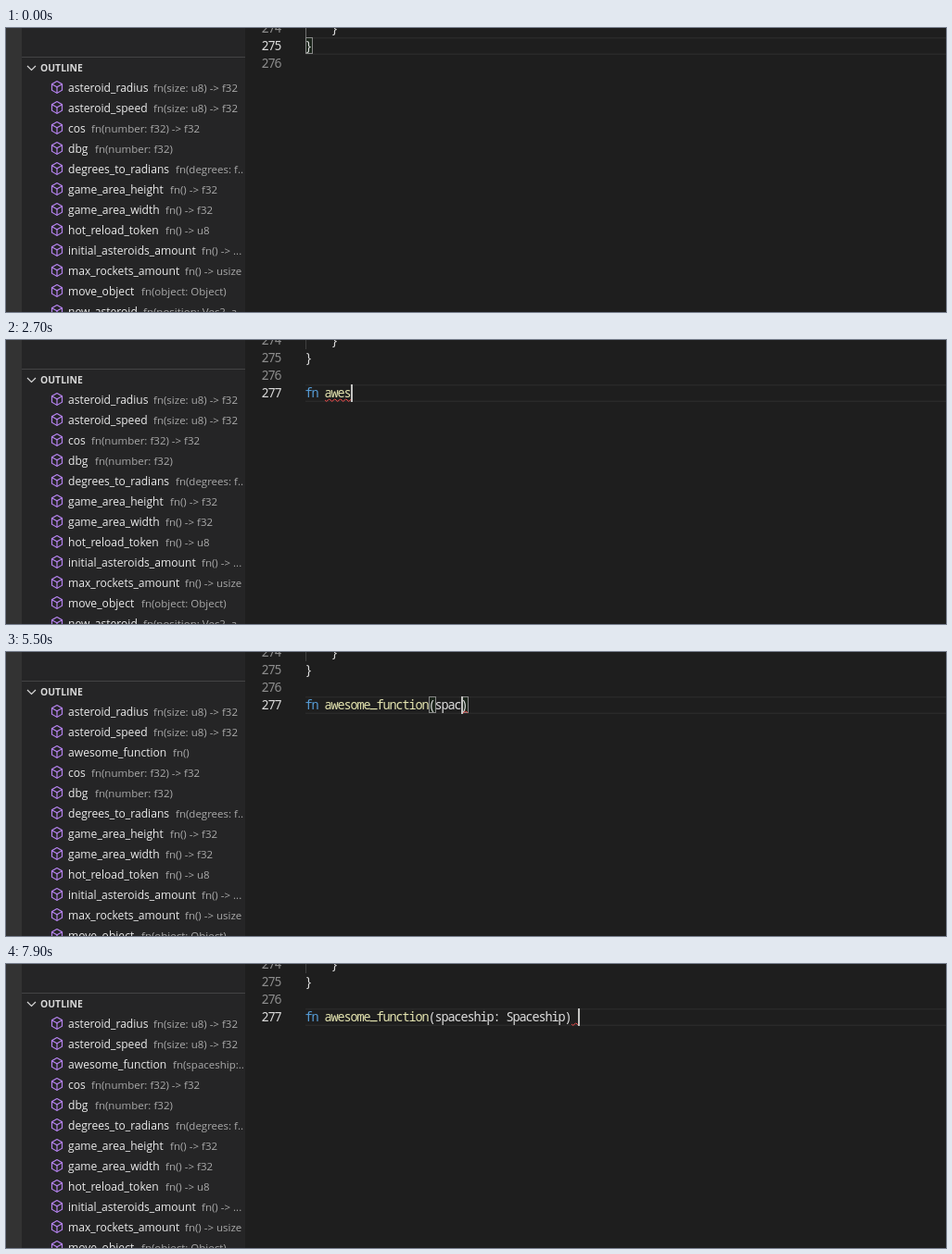
Animation, 1014 px wide and 307 px high, one loop 8 s. Source, as an HTML page with a canvas:

```html
<!DOCTYPE html>
<html lang="en">
<head>
<meta charset="utf-8">
<title>Code editor</title>
<style>
  html, body { margin: 0; width: 100%; height: 100%; overflow: hidden; background: #1e1e1e; }
  canvas { display: block; }
</style>
</head>
<body>
<canvas id="stage" width="1014" height="307"></canvas>
<script>
const ctx = document.getElementById('stage').getContext('2d');
const LOOP = 8000, CELL = 7, LINE = 19, CODE_X = 323, ROW = 22;
const mono = weight => `${weight} 13.5px "Noto Sans Mono", "DejaVu Sans Mono", monospace`;
const ui = (size, weight = 400) => `${weight} ${size}px "Open Sans", "Noto Sans", sans-serif`;
const ERROR = '#f76e58', TEXT = '#dedede';

// label, x of the signature, signature
const symbols = [
  ['asteroid_radius', 159, 'fn(size: u8) -> f32'],
  ['asteroid_speed', 159, 'fn(size: u8) -> f32'],
  ['cos', 92, 'fn(number: f32) -> f32'],
  ['dbg', 96, 'fn(number: f32)'],
  ['degrees_to_radians', 183, 'fn(degrees: f...'],
  ['game_area_height', 177, 'fn() -> f32'],
  ['game_area_width', 172, 'fn() -> f32'],
  ['hot_reload_token', 172, 'fn() -> u8'],
  ['initial_asteroids_amount', 211, 'fn() -> ...'],
  ['max_rockets_amount', 193, 'fn() -> usize'],
  ['move_object', 146, 'fn(object: Object)'],
  ['new_asteroid', 148, 'fn(position: Vec2, a...'],
];

const ship = ['spaceship', 'spaceship_radius', 'spaceship_speed_decrease',
  'spaceship_speed_increase', 'spaceship_speed_max'];
const sWords = ['second_object', 'shoot', 'sin', 'size', ...ship,
  'spawn_new_asteroids', 'spawn_new_rocket', 'spawn_rocket_timer'];
const drawWords = ['draw_asteroid', 'draw_rocket', 'draw_spaceship', 'draw_text_line', 'spawn_rocket'];
const shipWords = [...ship, 'Spaceship', 'new_spaceship', 'render_spaceship', 'update_spaceship'];

const popup = (col, query, words, hover = -1) => ({ col, query, words, hover });
const awes = (red, count = '') => ({ label: 'awes', x: 101, sig: 'fn', red, count });
const awesome = (sig, red = false, count = '') => ({ label: 'awesome_function', x: 180, sig, red, count });
const type = (text, more) => ({ text, caret: text.length, ...more });
const typeName = (name, more) => type('fn ' + name, { err: [3, 3 + name.length], ...more });
// text inside an auto-closed pair of parentheses
const typeArgs = (args, more) => {
  const text = `fn awesome_function(${args})`, end = text.length - 1;
  return { text, caret: end, pair: true, err: [end, end + 1], ...more };
};

const start = {
  line: 275, caret: -1, text: '', err: null, pair: false, keyword: false,
  brace: true, popup: null, entry: null, bar: false,
};
const steps = [
  [600, { line: 276, caret: 0 }],
  [700, { brace: false }],
  [1100, { caret: -1 }],
  [1400, { line: 277, caret: 0 }],
  [1900, type('f')],
  [2000, type('fn')],
  [2100, type('fn ')],
  [2200, { err: [0, 2] }],
  [2300, typeName('a', { keyword: true })],
  [2400, typeName('aw')],
  [2500, typeName('awe')],
  [2600, { popup: popup(6, 'awe', drawWords) }],
  [2700, typeName('awes', { popup: null })],
  [3000, typeName('aweso')],
  [3100, { entry: awes(false), bar: true }],
  [3200, typeName('awesom')],
  [3300, typeName('awesome')],
  [3400, { entry: awes(true, '2') }],
  [3500, typeName('awesome_')],
  [3700, typeName('awesome_f')],
  [3800, typeName('awesome_fu')],
  [3900, typeName('awesome_fun')],
  [4000, typeName('awesome_func')],
  [4100, typeName('awesome_funct')],
  [4200, typeName('awesome_functi')],
  [4300, typeName('awesome_functio', { bar: false })],
  [4400, typeName('awesome_function')],
  [4600, typeArgs('')],
  [4700, { entry: awes(false) }],
  [4800, typeArgs('s')],
  [4900, { popup: popup(21, 's', sWords) }],
  [5000, { popup: popup(21, 's', sWords, 1) }],
  [5100, { entry: awesome('fn()') }],
  [5300, typeArgs('sp', { popup: null })],
  [5400, typeArgs('spa')],
  [5500, typeArgs('spac')],
  [5600, typeArgs('space')],
  [5700, { popup: popup(25, 'space', shipWords), entry: awesome('fn(space)') }],
  [6000, typeArgs('spaceship', { popup: null })],
  [6100, { entry: awesome('fn(space)', true, '5') }],
  [6200, { entry: awesome('fn(spaceship)', true) }],
  [6500, typeArgs('spaceship:')],
  [6600, typeArgs('spaceship: ', { entry: awesome('fn(spaceship:...') })],
  [6800, typeArgs('spaceship: S')],
  [6900, { popup: popup(32, 's', ['Spaceship', ...sWords.slice(0, 11)]) }],
  [7200, typeArgs('spaceship: Spaceship', { popup: null })],
  [7500, { caret: 41 }],
  [7700, type('fn awesome_function(spaceship: Spaceship) ', { pair: false, err: null })],
  [7800, { err: [41, 42] }],
];

const stateAt = t => Object.assign({}, start, ...steps.filter(s => s[0] <= t).map(s => s[1]));

function rect(x, y, w, h, color) {
  ctx.fillStyle = color;
  ctx.fillRect(x, y, w, h);
}

function frame(x, y, w, h, color) {
  ctx.strokeStyle = color;
  ctx.lineWidth = 1;
  ctx.strokeRect(x + 0.5, y + 0.5, w - 1, h - 1);
}

function label(text, x, y, font, color) {
  ctx.font = font;
  ctx.fillStyle = color;
  ctx.fillText(text, x, y);
}

// one glyph per cell; underscores sit close to the baseline
function code(text, x, y, color, weight = 500) {
  ctx.textAlign = 'center';
  [...text].forEach((ch, i) => {
    label(ch, x + (i + 0.5) * CELL, ch === '_' ? y - 2 : y, mono(weight), color);
  });
  ctx.textAlign = 'left';
}

function polyline(points, color, width = 1) {
  ctx.beginPath();
  points.forEach(([x, y]) => ctx.lineTo(x, y));
  ctx.strokeStyle = color;
  ctx.lineWidth = width;
  ctx.stroke();
}

const colX = col => CODE_X + col * CELL;
const lineTop = n => 10 + (n - 275) * LINE;

function cube(x, y) {
  const edge = points => polyline(points.map(([px, py]) => [x + px, y + py]), '#b583ee', 1.2);
  edge([[8, 1.5], [13.5, 4.7], [13.5, 11.2], [8, 14.4], [2.5, 11.2], [2.5, 4.7], [8, 1.5]]);
  edge([[2.5, 4.7], [8, 7.7], [13.5, 4.7]]);
  edge([[8, 7.7], [8, 14.4]]);
}

function outlineRow(i, { label: name, x, sig, red, count }) {
  const y = 69 + i * ROW;
  cube(47, y - 13);
  label(name, 67, y, ui(12.1), red ? ERROR : '#ebebeb');
  label(sig, x, y, ui(11.5), '#aaaaaa');
  if (count) label(count, 238, y, ui(11.5, 600), ERROR);
}

function sidebar(s) {
  rect(0, 0, 17, 307, '#333333');
  rect(17, 0, 241, 307, '#252526');
  rect(17, 31, 241, 1, '#434344');
  polyline([[23, 41], [27.5, 45.5], [32, 41]], '#d8d8d8', 1.2);
  label('OUTLINE', 37, 47, ui(10.4, 700), '#d8d8d8');
  const rows = symbols.map(([name, x, sig]) => ({ label: name, x, sig }));
  if (s.entry) rows.splice(2, 0, s.entry);
  ctx.save();
  ctx.beginPath();
  ctx.rect(17, 32, 240, 275);
  ctx.clip();
  rows.forEach((row, i) => outlineRow(i, row));
  if (s.bar) rect(247, 54, 10, 226, 'rgba(121,121,121,.2)');
  ctx.restore();
}

function bracketBox(col, y) {
  rect(colX(col), y, CELL, LINE - 1, 'rgba(0,100,0,.1)');
  frame(colX(col), y, CELL + 1, LINE - 1, '#888888');
}

function squiggle(from, to, y) {
  ctx.save();
  ctx.beginPath();
  ctx.rect(colX(from), y, (to - from) * CELL, 4);
  ctx.clip();
  const points = [];
  for (let x = colX(from) - 1.3, k = 0; x < colX(to) + 3; x += 3, k++) points.push([x, y + (k % 2 ? 2.9 : 0.3)]);
  polyline(points, '#f14c4c');
  ctx.restore();
}

function editor(s) {
  const top = lineTop(s.line), y = lineTop(277) + 14;
  rect(CODE_X, top, 1014 - CODE_X, 1.5, '#292929');
  rect(CODE_X, top + LINE - 1.5, 1014 - CODE_X, 1.5, '#292929');
  rect(CODE_X, 0, 1, 10, s.brace ? '#707070' : '#404040');
  for (let n = 274; n <= Math.max(276, s.line); n++) {
    code(String(n), 276, lineTop(n) + 14, n === s.line ? '#dadada' : '#8c8c8c');
  }
  if (s.brace) bracketBox(0, 10);
  code('}', colX(4), 5, TEXT);
  code('}', colX(0), 24, TEXT);

  if (s.pair) [19, s.text.length - 1].forEach(col => bracketBox(col, 48));
  code(s.text.slice(0, 3), colX(0), y, s.keyword ? '#569cd6' : TEXT);
  code(s.text.slice(3, 19), colX(3), y, '#e4e4b0');
  code(s.text.slice(19), colX(19), y, TEXT);
  if (s.err) squiggle(...s.err, 63.5);
  if (s.caret >= 0) rect(colX(s.caret), top, 2, LINE, '#c4c4c2');
}

function suggestion(word, query, x, y) {
  let hit = 0;
  [...word].forEach((ch, i) => {
    const match = ch.toLowerCase() === query[hit];
    if (match) hit++;
    code(ch, x + i * CELL, y, match ? '#0097fb' : TEXT, match ? 700 : 500);
  });
}

function suggestions({ col, query, words, hover }) {
  const x = colX(col), y = 67, w = 432, h = words.length * LINE + 4;
  rect(x, y, w, h, '#252526');
  rect(x + 1, y + 1, w - 2, LINE, '#062f4a');
  if (hover > 0) rect(x + 1, y + 1 + hover * LINE, w - 2, LINE, '#2a2d2e');
  words.forEach((word, i) => {
    const base = y + 15 + i * LINE;
    label('abc', x + 4, base - 1, ui(9, 600), '#e0e0e0');
    suggestion(word, query, x + 23, base);
  });
  if (words.length > 11) rect(x + w - 11, y + 1, 10, 103, 'rgba(121,121,121,.15)');
  frame(x, y, w, h, '#454545');
}

function draw(now) {
  const s = stateAt((now - begin) % LOOP);
  rect(0, 0, 1014, 307, '#1e1e1e');
  sidebar(s);
  editor(s);
  if (s.popup) suggestions(s.popup);
  requestAnimationFrame(() => draw(performance.now()));
}

const begin = performance.now();
draw(begin);
</script>
</body>
</html>
```
